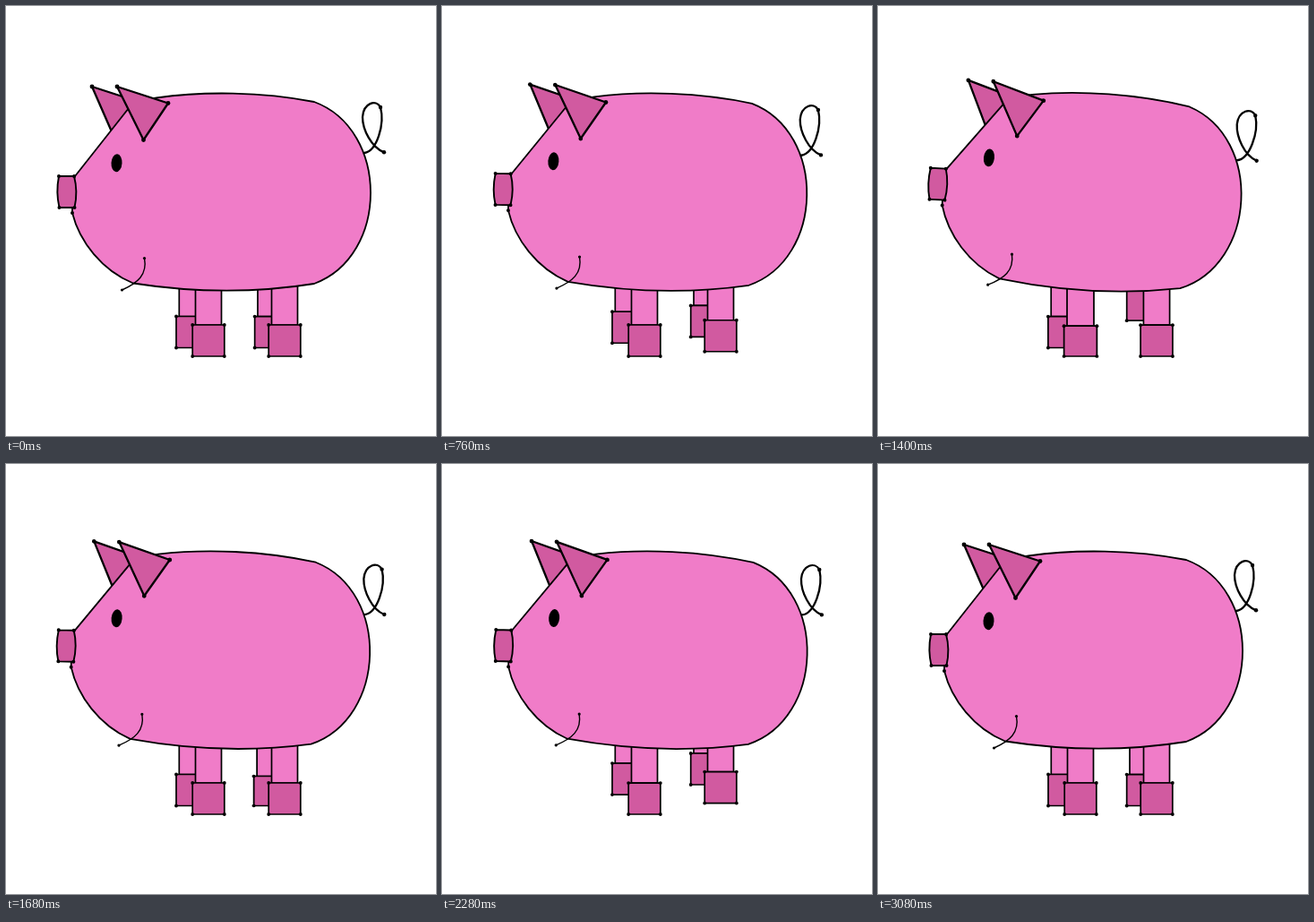
An HTML page with a canvas that plays this animation: 480x480 px, repeating every 3.6 s.

```html
<!DOCTYPE html>
<html>
<head>
<meta charset="utf-8">
<style>
html, body { margin: 0; width: 100%; height: 100%; overflow: hidden; background: #fff; }
canvas { display: block; width: 480px; height: 480px; }
</style>
</head>
<body>
<canvas id="stage"></canvas>
<script>
const PINK = '#f07cc8', ROSE = '#d15aa0', INK = '#000';
const LOOP = 3600, STEP = 40, WALK = 3080, STRIDE = 770;

const canvas = document.getElementById('stage');
const ratio = window.devicePixelRatio || 1;
canvas.width = canvas.height = 480 * ratio;
const ctx = canvas.getContext('2d');
ctx.lineCap = ctx.lineJoin = 'round';

// Hops are [time of the peak, height]; crouch is the time of the deepest squash.
const LEGS = [
  { x: 207.8, floor: 381.5, crouch: 470, hops: [[704, 17.5]] },
  { x: 295.5, floor: 381.5, crouch: 195, hops: [[442, 29], [677, 39]] },
  { x: 226, floor: 391, crouch: 535, hops: [[270, 36], [485, 30]] },
  { x: 311, floor: 391, crouch: 470, hops: [[704, 17.5]] }
];

// Slow rise and quick fall within one stride, 0 to 1.
const heave = p => Math.sin(Math.PI * (p / STRIDE) ** 1.7) ** 0.45;
const tilt = p => 0.057 * heave(p);
const sway = p => heave(p) * (1.6 * Math.cos((p - 495) / 235 * 2 * Math.PI) - 0.9);

// Free fall, so higher hops last longer.
const lift = (hops, p) => Math.max(0, ...hops.map(([peak, h]) => h - ((p - peak) / 16) ** 2));
const squashAt = (crouch, p) => 0.08 * Math.exp(-(((p - crouch) / 100) ** 2));

function paint(fill, width) {
  if (fill) {
    ctx.fillStyle = fill;
    ctx.fill();
  }
  ctx.lineWidth = width;
  ctx.strokeStyle = INK;
  ctx.stroke();
}

function dots(points, r) {
  ctx.fillStyle = INK;
  for (const [x, y] of points) {
    ctx.beginPath();
    ctx.arc(x, y, r, 0, 7);
    ctx.fill();
  }
}

function polygon(points, fill, width, r) {
  ctx.beginPath();
  points.forEach(p => ctx.lineTo(...p));
  ctx.closePath();
  paint(fill, width);
  dots(points, r);
}

function box(x, y, w, h, fill, r) {
  polygon([[x, y], [x + w, y], [x + w, y + h], [x, y + h]], fill, 1.7, r);
}

function leg({ x, floor, crouch, hops }, p) {
  const up = lift(hops, p);
  const squash = up > 0 ? 0 : squashAt(crouch, p);
  ctx.save();
  ctx.translate(x, floor - up);
  ctx.scale(1 + squash, 1 - squash);
  box(-14.5, -85, 29, 50, PINK, 0.8);
  box(-17.8, -35, 35.6, 35, ROSE, 1.9);
  ctx.restore();
}

function ear(dx, tip) {
  polygon([[124 + dx, 90], [181 + dx, 108.5], [tip, 149.5]], ROSE, 2.3, 2.4);
}

function trunk() {
  ctx.beginPath();
  ctx.moveTo(77, 190);
  ctx.lineTo(137, 114);
  ctx.quadraticCurveTo(146, 106, 168, 102.5);
  ctx.bezierCurveTo(220, 95, 285, 95.5, 344, 107);
  ctx.bezierCurveTo(428, 138, 428, 279, 344, 310);
  ctx.bezierCurveTo(275, 321, 210, 320, 142, 309.5);
  ctx.bezierCurveTo(107, 295, 82, 263, 74, 231);
  ctx.lineTo(74, 200);
  ctx.closePath();
  paint(PINK, 1.8);
  dots([[74, 231]], 2);
}

function snout() {
  ctx.beginPath();
  ctx.moveTo(59, 190);
  ctx.lineTo(76, 190);
  ctx.quadraticCurveTo(80.5, 207, 76.5, 225);
  ctx.lineTo(59.5, 225);
  ctx.quadraticCurveTo(55.5, 208, 59, 190);
  paint(ROSE, 1.9);
  dots([[59, 190], [76, 190], [76.5, 225], [59.5, 225]], 2);
}

function face() {
  ctx.fillStyle = INK;
  ctx.beginPath();
  ctx.ellipse(123.5, 175.3, 6, 10, 0.06, 0, 7);
  ctx.fill();
  ctx.beginPath();
  ctx.moveTo(129.5, 317);
  ctx.bezierCurveTo(147, 309, 158, 300, 154.5, 281.5);
  paint(null, 1.4);
  dots([[129.5, 317], [154.5, 281.5]], 1.6);
}

function tail() {
  ctx.beginPath();
  ctx.moveTo(400, 164);
  ctx.bezierCurveTo(414, 162, 423, 132, 418, 113);
  ctx.bezierCurveTo(413, 104, 399, 108, 398, 124);
  ctx.bezierCurveTo(398, 138, 408, 158, 422, 163.3);
  paint(null, 2.3);
  dots([[418, 113], [422, 163.3]], 2.2);
}

function draw(time) {
  const t = Math.floor((time % LOOP) / STEP) * STEP;
  const p = t < WALK ? t % STRIDE : 0;
  ctx.setTransform(ratio, 0, 0, ratio, 0, 0);
  ctx.fillStyle = '#fff';
  ctx.fillRect(0, 0, 480, 480);
  LEGS.forEach(l => leg(l, p));

  ctx.translate(240 + sway(p), 222);
  ctx.rotate(tilt(p));
  ctx.translate(-240, -222);
  tail();
  ear(-28, 122);
  trunk();
  ear(0, 153.5);
  snout();
  face();
}

const start = performance.now();
function tick() {
  draw(performance.now() - start);
  requestAnimationFrame(tick);
}
tick();
</script>
</body>
</html>
```
